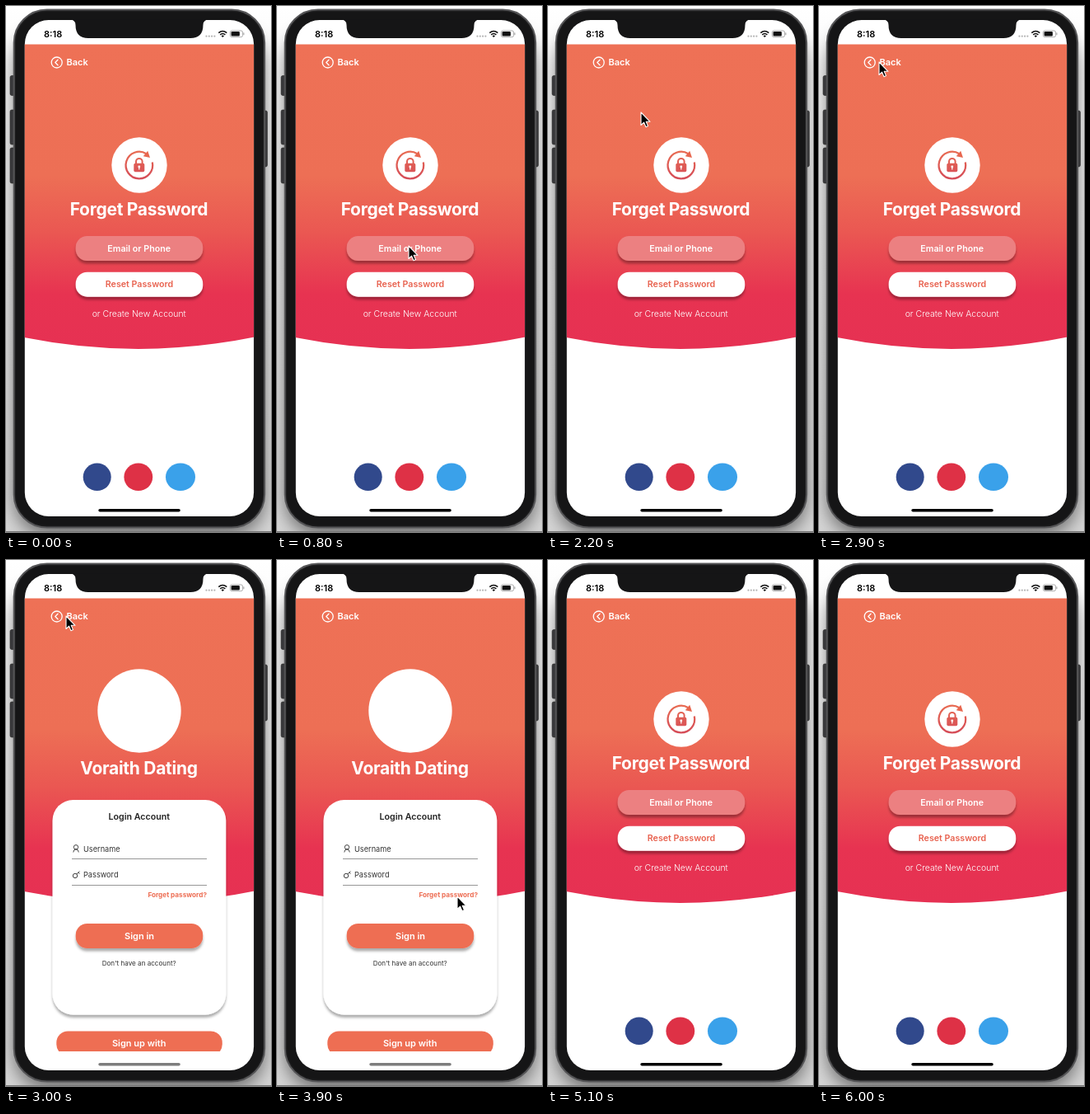
An HTML page for the animation above (6100 ms loop, 322x638 px).

```html
<!DOCTYPE html>
<html lang="en">
<head>
<meta charset="utf-8">
<title>Password reset flow</title>
<style>
html, body { margin: 0; width: 100%; height: 100%; overflow: hidden; background: #fff; }
svg { display: block; width: 322px; height: 638px; font-family: Inter, Roboto, sans-serif; }
.b { font-weight: 600; }
.mid { text-anchor: middle; }
.title { font-size: 21px; font-weight: 700; letter-spacing: -.28px; fill: #fff; text-anchor: middle; }
</style>
</head>
<body>
<svg viewBox="0 0 322 638" xmlns="http://www.w3.org/2000/svg">
  <defs>
    <linearGradient id="sky" gradientUnits="userSpaceOnUse" x1="0" y1="47" x2="0" y2="416">
      <stop offset="0" stop-color="#ee7156"/>
      <stop offset=".43" stop-color="#ed6f55"/>
      <stop offset=".62" stop-color="#ea5752"/>
      <stop offset=".82" stop-color="#e73351"/>
      <stop offset="1" stop-color="#e63153"/>
    </linearGradient>
    <linearGradient id="mark" gradientUnits="userSpaceOnUse" x1="0" y1="176" x2="0" y2="210">
      <stop offset="0" stop-color="#e86b52"/>
      <stop offset="1" stop-color="#d54c58"/>
    </linearGradient>
    <linearGradient id="room" x1="0" y1="0" x2="0" y2="1">
      <stop offset="0" stop-color="#fff"/>
      <stop offset=".25" stop-color="#f2f2f2"/>
      <stop offset="1" stop-color="#d6d6d6"/>
    </linearGradient>
    <filter id="soft" x="-20%" y="-20%" width="140%" height="140%"><feGaussianBlur stdDeviation="11"/></filter>
    <filter id="drop" x="-10%" y="-20%" width="120%" height="160%">
      <feDropShadow dx="0" dy="3.500" stdDeviation="1.700" flood-color="#000" flood-opacity=".32"/>
    </filter>
    <clipPath id="screen"><rect x="22.800" y="17" width="278.300" height="602" rx="29"/></clipPath>
    <clipPath id="scroll"><rect x="23" y="47" width="279" height="549"/></clipPath>
  </defs>

  <rect width="322" height="638" fill="url(#room)"/>
  <rect x="10" y="30" width="304" height="612" rx="42" fill="#000" opacity=".5" filter="url(#soft)"/>
  <path d="M0 637.500H322" stroke="#777"/>

  <!-- phone -->
  <g fill="#3a3a3c" stroke="#222" stroke-width=".6">
    <rect x="5" y="84.500" width="8" height="24" rx="2"/>
    <rect x="5" y="126" width="8" height="42" rx="2"/>
    <rect x="5" y="172" width="8" height="43" rx="2"/>
    <rect x="309" y="127" width="8.500" height="68" rx="2"/>
  </g>
  <rect x="9.700" y="4.500" width="304.500" height="628" rx="40" fill="#1b1b1c" stroke="#565658" stroke-width="2"/>
  <rect x="12.200" y="7" width="299.500" height="623" rx="37.500" fill="#151516"/>

  <g clip-path="url(#screen)">
    <rect x="22" y="17" width="280" height="602" fill="#fff"/>
    <path d="M22 46.500H302V401.500Q162 430 22 402Z" fill="url(#sky)"/>

    <!-- status bar -->
    <text class="b" x="46" y="37.500" font-size="11">8:18</text>
    <g fill="#b5b5b5">
      <circle cx="243.500" cy="36.700" r="1.100"/><circle cx="246.800" cy="36.700" r="1.100"/>
      <circle cx="250.100" cy="36.700" r="1.100"/><circle cx="253.400" cy="36.700" r="1.100"/>
    </g>
    <g fill="none" stroke="#111" stroke-width="1.600">
      <path d="M258.300 32.700Q263.300 28.300 268.300 32.700"/>
      <path d="M260.200 34.800Q263.300 32.200 266.400 34.800"/>
    </g>
    <path d="M261.600 36.200Q263.300 34.800 265 36.200L263.300 38Z"/>
    <rect x="272.400" y="29.900" width="15.200" height="7.800" rx="2.200" fill="none" stroke="#999" stroke-width=".8"/>
    <rect x="273.600" y="31.100" width="10.300" height="5.400" rx="1.200" fill="#111"/>
    <path d="M288.900 32.400v2.800" stroke="#999" stroke-width="1"/>

    <!-- back link -->
    <g fill="none" stroke="#fff" stroke-width="1.300" stroke-linecap="round" stroke-linejoin="round">
      <circle cx="61.700" cy="68.500" r="6.500"/>
      <path d="M63 65.300L59.800 68.500L63 71.700"/>
    </g>
    <text class="b" x="73.500" y="72.200" font-size="11" fill="#fff">Back</text>

    <g id="forget">
      <circle cx="162" cy="193" r="33.700" fill="#fff"/>
      <path d="M177.800 189.500A16.300 16.300 0 1 1 170.500 179.200" fill="none" stroke="url(#mark)" stroke-width="2.300"/>
      <path d="M172.200 175.800L175 184L166.800 182.300Z" fill="#e8674f"/>
      <path d="M158 192V188.700a3.800 3.800 0 0 1 7.600 0V192" fill="none" stroke="url(#mark)" stroke-width="2"/>
      <rect x="155.300" y="190.700" width="13" height="10.600" rx="1.800" fill="url(#mark)"/>
      <circle cx="161.800" cy="195" r="1.400" fill="#fff"/>
      <path d="M161.800 195v3.600" stroke="#fff" stroke-width="1.200"/>
      <text class="title" x="161.500" y="253.700">Forget Password</text>
      <g filter="url(#drop)">
        <rect x="84.700" y="279" width="154.500" height="30" rx="14" fill="#ec8081"/>
        <rect x="84.700" y="322.700" width="154.500" height="30" rx="14" fill="#fff"/>
      </g>
      <g class="mid" font-size="10.700">
        <text class="b" x="161.700" y="297.700" fill="#fff">Email or Phone</text>
        <text class="b" x="162" y="341.100" fill="#e8624f">Reset Password</text>
        <text x="161.700" y="377" font-size="10.500" font-weight="300" fill="#fff">or Create New Account</text>
      </g>
      <ellipse cx="110.700" cy="571.300" rx="17" ry="16.800" fill="#31498c"/>
      <ellipse cx="160.800" cy="571.300" rx="17.400" ry="16.800" fill="#de3146"/>
      <ellipse cx="212" cy="571.300" rx="18" ry="16.800" fill="#3aa1ea"/>
    </g>

    <g id="login" clip-path="url(#scroll)">
      <circle cx="162" cy="183" r="50.700" fill="#fff"/>
      <text class="title" x="161.500" y="260.300">Voraith Dating</text>
      <rect x="56.500" y="291" width="210.800" height="260.500" rx="25" fill="#fff" filter="url(#drop)"/>
      <text class="b mid" x="161.800" y="314.800" font-size="10.700" fill="#222">Login Account</text>
      <g fill="none" stroke="#444" stroke-width="1">
        <circle cx="85" cy="348.300" r="2.700"/>
        <path d="M81.800 354.500Q82.200 350.800 85 350.800T88.300 354.500"/>
        <circle cx="84" cy="383" r="2.700"/>
        <path d="M85.900 381L89.300 377.500M87.600 379.200L89.500 380.300"/>
        <path d="M80 362.500H244M80 394.500H244" stroke="#8c8c8c" stroke-width=".9"/>
      </g>
      <g font-size="9.200" fill="#333">
        <text x="94" y="353.700">Username</text>
        <text x="94" y="385.300">Password</text>
      </g>
      <text x="244" y="409" font-size="8.200" font-weight="700" fill="#ed6e54" text-anchor="end">Forget password?</text>
      <rect x="84.700" y="441" width="154.500" height="30" rx="14" fill="#ee6e53" filter="url(#drop)"/>
      <text class="b mid" x="162" y="459.700" font-size="11" fill="#fff">Sign in</text>
      <text class="mid" x="161.700" y="492.300" font-size="8.100" fill="#333">Don't have an account?</text>
      <rect x="61.300" y="571.500" width="201.500" height="30" rx="14" fill="#ee6e53"/>
      <text class="b mid" x="161.700" y="590.300" font-size="11" fill="#fff">Sign up with</text>
    </g>

    <rect id="bar" x="112.300" y="610" width="99.500" height="3.600" rx="1.800"/>
  </g>

  <path d="M78 16.500Q84.500 17 84.500 23Q84.500 39 100 39H224Q239.500 39 239.500 23Q239.500 17 246 16.500Z" fill="#151516"/>

  <path id="cursor" d="M0 0V15.500L3.600 12.200L6 17.700L8.500 16.600L6.200 11.300H11Z" stroke="#fff" stroke-width="1.100" stroke-linejoin="round"/>
</svg>
<script>
const LOOP = 6100, STEP = 100;
const $ = id => document.getElementById(id);
const [forget, login, bar, cursor] = ["forget", "login", "bar", "cursor"].map($);

// pointer stops: time, x, y; equal neighbours mean a rest
const path = [
  [300, 2, 330], [700, 160, 291], [1200, 160, 291], [1500, 150, 292], [1700, 150, 292],
  [2200, 113, 129], [2600, 73, 68], [3200, 73, 68],
  [3900, 219, 408], [4800, 219, 408]
];
const show = (el, on) => el.setAttribute("visibility", on ? "visible" : "hidden");

// speed through a stop: none at the ends or beside a rest
function slope(i, c) {
  const a = path[i - 1], p = path[i], b = path[i + 1];
  if (!a || !b || (p[c] - a[c]) * (b[c] - p[c]) <= 0) return 0;
  return (b[c] - a[c]) / (b[0] - a[0]);
}

function hermite(t, i, c) {
  const a = path[i - 1], b = path[i], d = b[0] - a[0], k = (t - a[0]) / d;
  const s = k * k * (3 - 2 * k);
  return a[c] + (b[c] - a[c]) * s
    + d * k * (1 - k) * ((1 - k) * slope(i - 1, c) - k * slope(i, c));
}

function pointer(t) {
  const i = path.findIndex(p => t < p[0]);
  return i > 0 ? [hermite(t, i, 1), hermite(t, i, 2)] : null;
}

function draw(time) {
  const t = Math.floor((time % LOOP) / STEP) * STEP;
  const signIn = t >= 3000 && t < 4300;
  show(forget, !signIn);
  show(login, signIn);
  bar.setAttribute("fill", signIn ? "#7d7d7d" : "#000");
  const p = pointer(t);
  show(cursor, p);
  if (p) cursor.setAttribute("transform", `translate(${p[0].toFixed(1)} ${p[1].toFixed(1)})`);
}

const start = performance.now();
function tick() {
  draw(performance.now() - start);
  requestAnimationFrame(tick);
}
draw(0);
requestAnimationFrame(tick);
</script>
</body>
</html>
```
